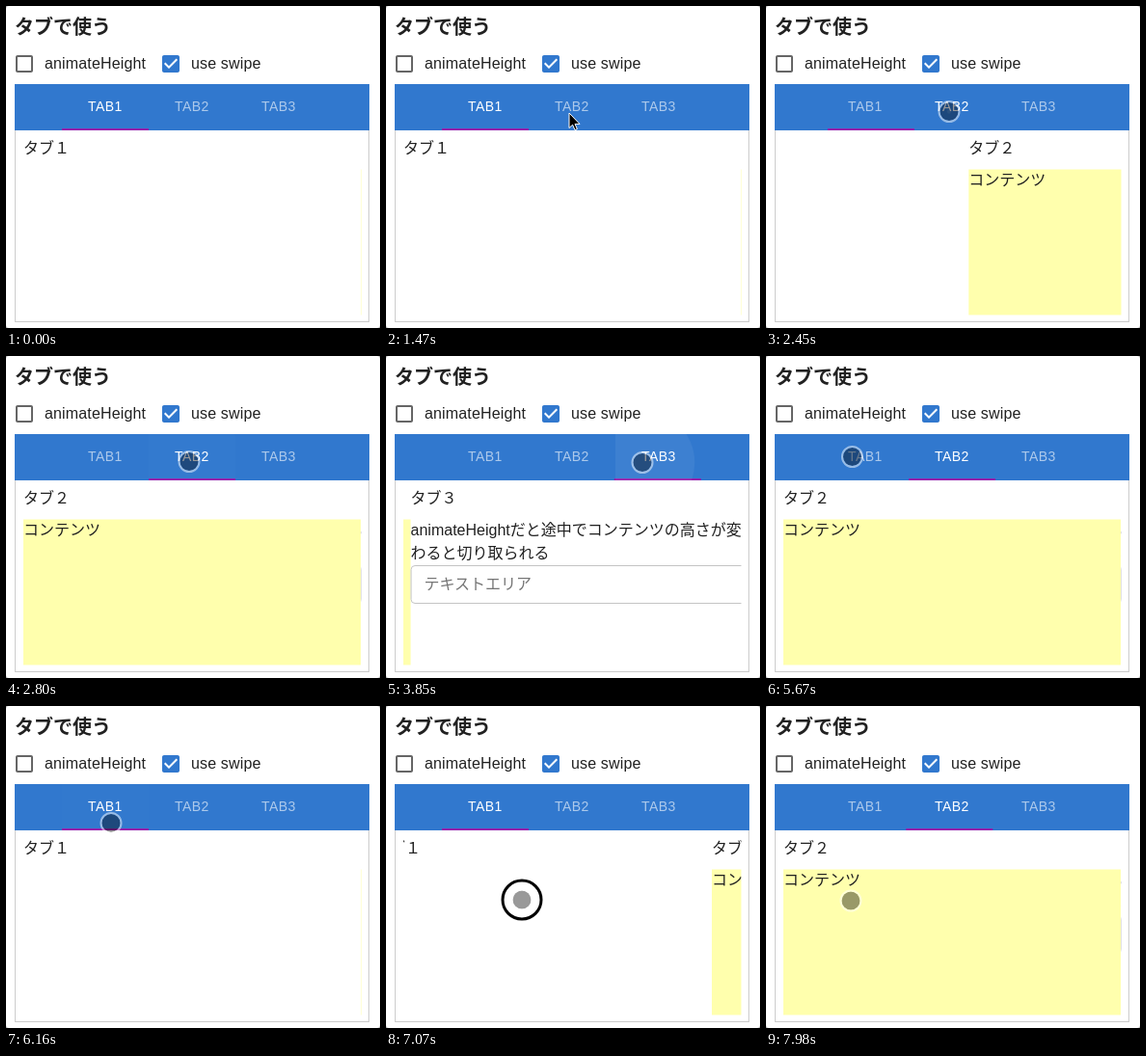
Recreate the animation shown at these times as an HTML page. Size 388 by 334 pixels, loop 8000 ms.

```html
<!DOCTYPE html>
<html lang="ja">
<head>
<meta charset="utf-8">
<style>
html, body { margin: 0; width: 100%; height: 100%; overflow: hidden; background: #aaa; }
svg { display: block; width: 388px; height: 334px; background: #fff; border-radius: 3px; }
text { font: 16px "Liberation Sans", "Noto Sans CJK JP", "Noto Sans CJK", sans-serif; fill: #212121; }
.title { font-size: 20px; font-weight: bold; }
.label { letter-spacing: .15px; }
.tab { font-size: 14px; letter-spacing: .4px; fill: #fff; }
</style>
</head>
<body>
<svg viewBox="0 0 388 334">
  <defs>
    <clipPath id="view"><rect x="18" y="130" width="350.5" height="197"/></clipPath>
    <clipPath id="button"><rect id="buttonBox" y="81" width="90" height="48"/></clipPath>
  </defs>

  <text class="title" x="9" y="28.5">タブで使う</text>
  <path transform="translate(7 48)" fill="#666" d="M19 5v14H5V5h14m0-2H5c-1.1 0-2 .9-2 2v14c0 1.1.9 2 2 2h14c1.1 0 2-.9 2-2V5c0-1.1-.9-2-2-2z"/>
  <text class="label" x="40" y="65">animateHeight</text>
  <path transform="translate(159 48)" fill="#3178ce" d="M19 3H5c-1.1 0-2 .9-2 2v14c0 1.1.9 2 2 2h14c1.1 0 2-.9 2-2V5c0-1.1-.9-2-2-2zm-9 14l-5-5 1.4-1.4L10 14.2l7.6-7.6L19 8z"/>
  <text class="label" x="192" y="65">use swipe</text>

  <rect x="9.5" y="100.500" width="367" height="227" fill="none" stroke="#ccc"/>
  <g clip-path="url(#view)">
    <g id="strip">
      <text x="18" y="153">タブ１</text>
      <g transform="translate(350)">
        <rect x="18" y="169.500" width="350" height="151" fill="#ffffad"/>
        <text x="18" y="153">タブ２</text>
        <text x="18" y="186">コンテンツ</text>
      </g>
      <g transform="translate(700)">
        <text x="18" y="153">タブ３</text>
        <text x="18" y="186">animateHeightだと途中でコンテンツの高さが変</text>
        <text x="18" y="210">わると切り取られる</text>
        <rect x="18.500" y="217.500" width="349" height="39" rx="4" fill="none" stroke="#c4c4c4"/>
        <text x="32" y="242" style="fill:#757575">テキストエリア</text>
      </g>
    </g>
  </g>

  <rect x="9" y="81" width="368" height="48" fill="#3178ce"/>
  <text class="tab" x="85" y="109">TAB1</text>
  <text class="tab" x="175" y="109">TAB2</text>
  <text class="tab" x="265" y="109">TAB3</text>
  <rect id="bar" y="127" width="90" height="2" fill="#9620ab"/>
  <g clip-path="url(#button)"><circle id="ripple" fill="#fff"/></g>

  <g id="cursor">
    <path id="arrow" d="M0 0V15.500L3.600 12.200 6 17.600 8.400 16.600 6 11.400H11Z" stroke="#fff"/>
    <g id="dot">
      <circle r="9.500" fill-opacity=".4"/>
      <circle r="10.500" fill="none" stroke="#fff" stroke-opacity=".5" stroke-width="2"/>
    </g>
    <circle id="ring" r="20" fill="none" stroke="#000" stroke-width="3"/>
  </g>
</svg>
<script>
const LOOP = 8000, STEP = 70, SLIDE = 350, TAB = 90;
const $ = id => document.getElementById(id);
const tabs = document.querySelectorAll('.tab');

// time, x, y of the pointer
const path = [
  [70, 12, 15], [350, 364, 284], [630, 201, 180], [770, 201, 180], [980, 190, 118],
  [1190, 190, 118], [1260, 190, 111], [1610, 190, 111], [1680, 196, 112],
  [1750, 190, 109.5], [2800, 190, 109.5], [3010, 241, 110], [3150, 266, 110.5],
  [3990, 266, 110.5], [4340, 193, 110], [4480, 189, 110], [4830, 189, 110],
  [5250, 89.5, 104.5], [6090, 89.5, 104.5], [6440, 187, 189], [6580, 191.5, 200.5],
  [6860, 192, 201], [7070, 141, 201], [7280, 88, 202]
];
const presses = [[1260, 1470], [2240, 2380], [3430, 3570], [4550, 4690], [5530, 5670], [6720, 7345]];
const SWIPE = 6860, DROP = 7345;

// start of slide, of bar and of highlight for each tab change
const click = (t, from, to) => ({ slide: t, bar: t + 20, on: t, from, to, tap: true });
const moves = [
  click(2385, 0, 1), click(3575, 1, 2), click(4695, 2, 1), click(5675, 1, 0),
  { slide: DROP, bar: 7746, on: 7700, from: 83 / SLIDE, to: 1 }
];

const clamp = v => Math.min(1, Math.max(0, v));
const mix = (a, b, k) => a + (b - a) * k;

function bezier(x1, y1, x2, y2) {
  const at = (a, b, s) => 3 * (1 - s) ** 2 * s * a + 3 * (1 - s) * s * s * b + s ** 3;
  return x => {
    x = clamp(x);
    if (x === 0 || x === 1) return x;
    let lo = 0, hi = 1;
    for (let i = 0; i < 24; i++) {
      const mid = (lo + hi) / 2;
      if (at(x1, x2, mid) < x) lo = mid; else hi = mid;
    }
    return at(y1, y2, lo);
  };
}
const glide = bezier(.15, .3, .25, 1), inOut = bezier(.4, 0, .2, 1);

function pointer(t) {
  const i = path.findIndex(p => p[0] > t);
  if (i < 0) return path[path.length - 1].slice(1);
  if (i === 0) return path[0].slice(1);
  const [t0, x0, y0] = path[i - 1], [t1, x1, y1] = path[i], k = (t - t0) / (t1 - t0);
  return [mix(x0, x1, k), mix(y0, y1, k)];
}

const set = (el, attrs) => { for (const k in attrs) el.setAttribute(k, attrs[k]); };
const show = (el, on) => { el.style.display = on ? '' : 'none'; };

function drawRipple(t) {
  const m = moves.filter(m => m.tap && t >= m.slide).pop();
  const age = m ? (t - m.slide) / 550 : 1;
  show($('ripple'), age < 1);
  if (age >= 1) return;
  const [cx, cy] = pointer(m.slide), left = 58 + TAB * m.to, k = inOut(age);
  const reach = Math.hypot(Math.max(cx - left, left + TAB - cx) + 1, Math.max(cy - 81, 129 - cy) + 1);
  set($('buttonBox'), { x: left });
  set($('ripple'), { cx, cy, r: reach * k, 'fill-opacity': mix(.1, .3, k) * (1 - k) });
}

function draw(t) {
  const [x, y] = pointer(t);
  let page = 0, bar = 0, active = 0;
  for (const m of moves) {
    if (t >= m.slide) page = mix(m.from, m.to, glide((t - m.slide) / SLIDE));
    if (t >= m.bar) bar = mix(Math.round(m.from), m.to, inOut((t - m.bar) / 300));
    if (t >= m.on) active = m.to;
  }
  if (t >= SWIPE && t < DROP) page = Math.max(0, 171 - x) / SLIDE;

  set($('strip'), { transform: `translate(${-SLIDE * page})` });
  set($('bar'), { x: 58 + TAB * bar });
  tabs.forEach((tab, i) => { tab.style.opacity = i === active ? 1 : .6; });
  drawRipple(t);

  set($('cursor'), { transform: `translate(${x} ${y})` });
  show($('cursor'), t >= 70);
  show($('arrow'), t < 1750);
  show($('dot'), t >= 1750);
  show($('ring'), presses.some(([a, b]) => t >= a && t < b));
}

const start = performance.now();
function tick() {
  const t = Math.max(0, performance.now() - start) % LOOP;
  draw(Math.floor(t / STEP) * STEP);
  requestAnimationFrame(tick);
}
tick();
</script>
</body>
</html>
```
